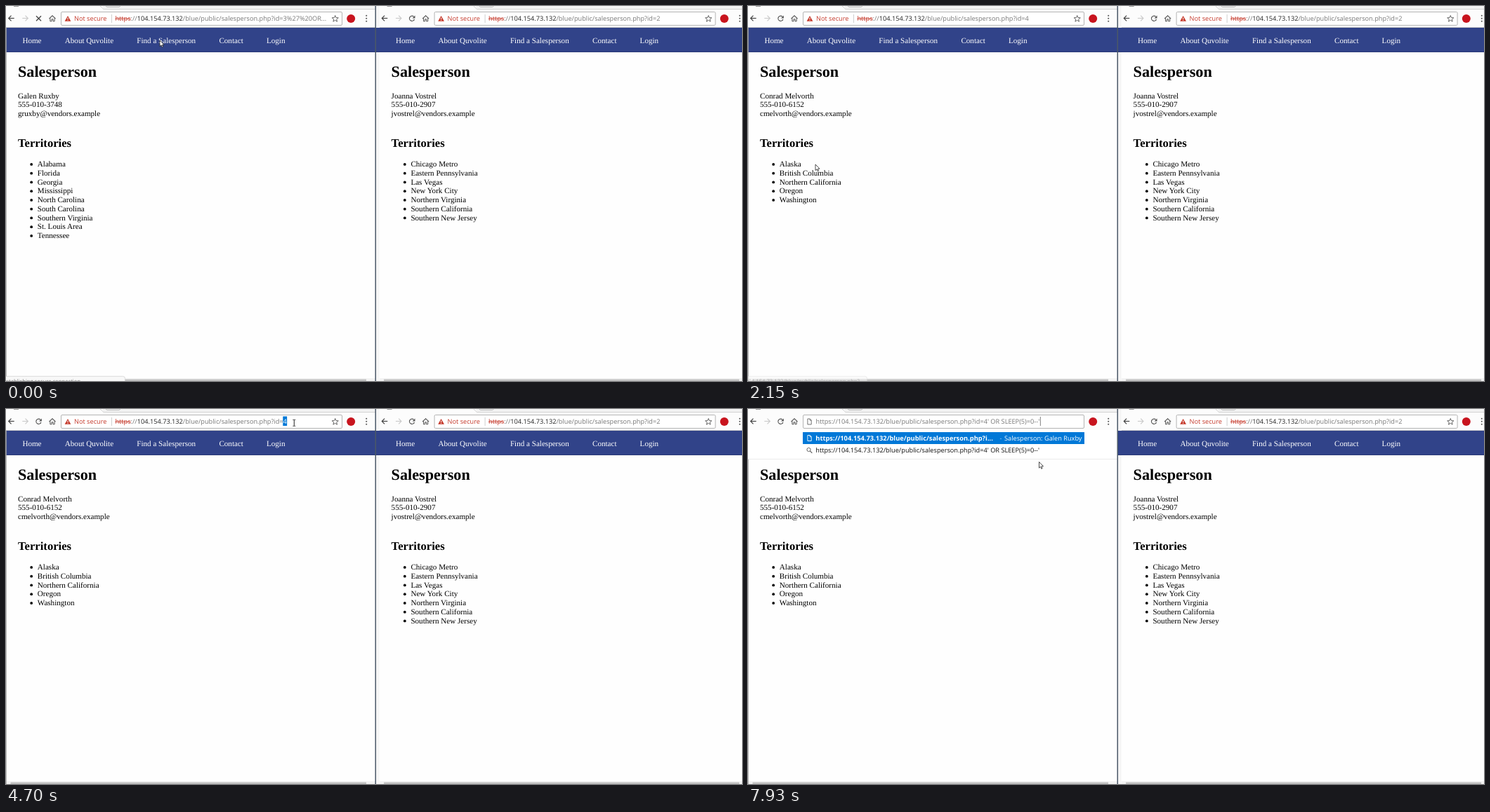
These frames come from a looping animation (1048 by 535 pixels, 8000 ms). An HTML page with a canvas:

```html
<!DOCTYPE html>
<html lang="en">
<head>
<meta charset="utf-8">
<title>Two browser windows</title>
<style>
html, body { margin: 0; width: 100%; height: 100%; overflow: hidden; background: #fefefe; }
canvas { display: block; }
</style>
</head>
<body>
<canvas id="stage" width="1048" height="535"></canvas>
<script>
const ctx = document.getElementById('stage').getContext('2d');
const LOOP = 8000;
const SERIF = '"Liberation Serif", serif';
const UI = '"Open Sans", sans-serif';
const BODY = 11.1, LINE = 12.75, URL_SIZE = 9.2, SMALL = 7.7;
const RIGHT = 531.6;
const BLUE = '#0078d7', RED = '#c5392b', INK = '#000';
const HOST = '104.154.73.132', BASE = '/blue/public/';
const PROFILE_PATH = BASE + 'salesperson.php?id=';
const FULL = 'https://' + HOST + PROFILE_PATH;
const INJECTED = FULL + "4' OR SLEEP(5)=0--'";

const galen = {
  name: 'Galen Ruxby', phone: '555-010-3748', mail: 'gruxby@vendors.example',
  areas: ['Alabama', 'Florida', 'Georgia', 'Mississippi', 'North Carolina', 'South Carolina',
    'Southern Virginia', 'St. Louis Area', 'Tennessee']
};
const joanna = {
  name: 'Joanna Vostrel', phone: '555-010-2907', mail: 'jvostrel@vendors.example',
  areas: ['Chicago Metro', 'Eastern Pennsylvania', 'Las Vegas', 'New York City',
    'Northern Virginia', 'Southern California', 'Southern New Jersey']
};
const conrad = {
  name: 'Conrad Melvorth', phone: '555-010-6152', mail: 'cmelvorth@vendors.example',
  areas: ['Alaska', 'British Columbia', 'Northern California', 'Oregon', 'Washington']
};
const ELSIE = 'Elsie Dulvin', DOROTHY = 'Dorothy Fenstrup';
const states = [
  ['Alabama (AL)', galen.name], ['Alaska (AK)', conrad.name], ['Arizona (AZ)', ELSIE],
  ['Arkansas (AR)', 'Henrietta Udven'],
  ['California (CA)', 'Northern California/' + conrad.name, 'Southern California/' + joanna.name],
  ['Colorado (CO)', ELSIE], ['Connecticut (CT)', DOROTHY], ['Delaware (DE)', DOROTHY],
  ['Florida (FL)', galen.name]
];

// time, x, y, shape
const pointer = [
  [0, 219, 49, arrow], [270, 214, 54, arrow], [400, 208, 56, arrow], [550, 207, 58, arrow],
  [700, 180, 140, arrow], [820, 140, 230, arrow], [940, 113, 281, arrow], [1090, 103, 262, arrow],
  [1220, 92, 238, arrow], [1370, 95, 230, hand], [1490, 96, 228, hand], [1610, 96.7, 226, hand],
  [2150, 96, 226, arrow], [2300, 190, 165, arrow], [2430, 352, 64, arrow], [2580, 380, 46, arrow],
  [2730, 401, 32, arrow], [2880, 404, 30, beam], [3010, 405, 25.5, beam], [3160, 408, 22, beam],
  [3290, 410.3, 19.8, beam], [6730, 410, 18, arrow], [7120, 416, 50, arrow], [7240, 422, 87, arrow],
  [7780, 421, 83, arrow], [7930, 414.5, 75.5, arrow]
];
const bubbleAlpha = [[0, 1], [270, .66], [400, .33], [550, 0], [1370, .25], [1490, .5],
  [1610, .75], [1730, 1], [2150, .5], [2300, 0]];
const selection = [[0, ''], [3160, 'all'], [3440, 'id'], [3850, 'all'], [4120, 'id'],
  [4430, 'all'], [4700, 'id'], [6430, '']];
const menuAlpha = [[0, 0], [6730, .4], [6850, .75], [6970, 1], [7390, .4], [7520, 0]];

const at = (track, t) => track.findLast(step => step[0] <= t);

function rect(x, y, w, h, color) {
  ctx.fillStyle = color;
  ctx.fillRect(x, y, w, h);
}

function setFont(size, family, weight = 400) {
  ctx.font = `${weight} ${size}px ${family}`;
}

// Returns the x where the text ends.
function text(str, x, y, size, color, family = UI, weight = 400) {
  setFont(size, family, weight);
  ctx.fillStyle = color;
  ctx.fillText(str, x, y);
  return x + ctx.measureText(str).width;
}

function serif(str, x, y, color = INK, weight = 400, size = BODY) {
  return text(str, x, y, size, color, SERIF, weight);
}

function poly(points, fill, stroke, width = 1, close = true) {
  ctx.beginPath();
  points.forEach(([x, y]) => ctx.lineTo(x, y));
  if (close) ctx.closePath();
  if (fill) { ctx.fillStyle = fill; ctx.fill(); }
  if (stroke) { ctx.strokeStyle = stroke; ctx.lineWidth = width; ctx.stroke(); }
}

const line = (points, color, width) => poly(points, null, color, width, false);

function circle(x, y, r, color) {
  ctx.beginPath();
  ctx.arc(x, y, r, 0, Math.PI * 2);
  ctx.fillStyle = color;
  ctx.fill();
}

function placed(x, y, draw) {
  ctx.save();
  ctx.translate(x, y);
  draw();
  ctx.restore();
}

function faded(alpha, draw) {
  if (!alpha) return;
  ctx.save();
  ctx.globalAlpha = alpha;
  draw();
  ctx.restore();
}

// Pointers, drawn around their hot spot
function arrow() {
  poly([[0, 0], [0, 8.6], [2, 6.8], [3.3, 9.8], [4.6, 9.2], [3.4, 6.3], [6, 6.2]], '#fff', '#222', .8);
}

function hand() {
  poly([[-.8, .6], [0, 0], [.8, .6], [.9, 4], [5, 5], [5.6, 6], [5, 10], [4.2, 12.5], [-.4, 12.5],
    [-3, 8.5], [-2.6, 7.3], [-.8, 8.2]], '#fff', '#222', .9);
  line([[2.4, 4.6], [2.4, 6.8]], '#333', .6);
  line([[3.9, 5], [3.9, 7]], '#333', .6);
}

function beam() {
  line([[0, -4], [0, 4]], '#222', 1);
  line([[-2, -4.5], [2, -4.5]], '#222', .8);
  line([[-2, 4.5], [2, 4.5]], '#222', .8);
}

// Toolbar icons, centred on the origin
function backIcon(color) {
  line([[4.2, 0], [-3.6, 0]], color, 1.2);
  line([[0, -3.8], [-3.8, 0], [0, 3.8]], color, 1.2);
}

function reloadIcon() {
  ctx.beginPath();
  ctx.arc(0, 0, 3.6, .35, Math.PI * 1.75);
  ctx.strokeStyle = '#555';
  ctx.lineWidth = 1.2;
  ctx.stroke();
  poly([[4.4, -4.4], [4.4, -.4], [.5, -.4]], '#555');
}

function stopIcon() {
  line([[-3.5, -3.5], [3.5, 3.5]], '#444', 1.3);
  line([[-3.5, 3.5], [3.5, -3.5]], '#444', 1.3);
}

function homeIcon() {
  line([[-4.6, .3], [0, -4], [4.6, .3]], '#555', 1.1);
  line([[-3.1, -.6], [-3.1, 4], [-1, 4], [-1, 1], [1, 1], [1, 4], [3.1, 4], [3.1, -.6]], '#555', 1);
}

function starIcon() {
  const points = Array.from({ length: 10 }, (_, i) => {
    const a = i * Math.PI / 5, r = i % 2 ? 2.1 : 4.8;
    return [r * Math.sin(a), -r * Math.cos(a)];
  });
  poly(points, null, '#555', .9);
}

function pageIcon(color) {
  poly([[-2.6, -4], [.8, -4], [2.7, -2], [2.7, 4], [-2.6, 4]], null, color, .9);
  line([[.6, -4], [.6, -1.8], [2.7, -1.8]], color, .8);
}

function searchIcon() {
  ctx.beginPath();
  ctx.arc(-.8, -.8, 2.6, 0, Math.PI * 2);
  ctx.strokeStyle = '#555';
  ctx.lineWidth = .9;
  ctx.stroke();
  line([[1.1, 1.1], [4, 4]], '#555', 1.1);
}

function warningIcon() {
  poly([[0, -4], [4.4, 3.8], [-4.4, 3.8]], RED);
  rect(-.5, -1.4, 1, 2.6, '#fff');
  rect(-.5, 1.9, 1, 1, '#fff');
}

function toolbar(width, loading, typing) {
  rect(0, 0, width, 30.5, '#fcfcfc');
  rect(138, 0, width - 138, 5, '#f3f3f3');
  line([[134, 0], [139, 4.6], [width, 4.6]], '#c9c9c9', .8);
  line([[142, 0], [144, 1.4], [161, 1.4], [163, 0]], '#aaa', .8);
  rect(11, 0, 7, 1, '#999');
  rect(0, 30, width, 1, '#c8c8c8');
  placed(7.5, 17.5, () => backIcon('#444'));
  placed(27.5, 17.5, () => { ctx.scale(-1, 1); backIcon('#ccc'); });
  placed(46.5, 17.8, loading ? stopIcon : reloadIcon);
  placed(66, 17.8, homeIcon);
  ctx.fillStyle = '#fff';
  ctx.strokeStyle = '#b4b4b4';
  ctx.lineWidth = 1;
  ctx.beginPath();
  ctx.roundRect(78.5, 8.5, 400, 19, 1.5);
  ctx.fill();
  ctx.stroke();
  if (!typing) {
    placed(88, 18, warningIcon);
    text('Not secure', 97, 21.4, URL_SIZE, RED);
    rect(150, 12, 1, 12, '#d0d0d0');
    placed(468.7, 18.3, starIcon);
  }
  circle(491.2, 18, 6, '#c8141e');
  [-4, 0, 4].forEach(dy => circle(513.2, 17.8 + dy, 1.05, '#555'));
}

function caretAt(x) {
  rect(x + .6, 11, .8, 13, '#666');
}

function address(path, mode = '', caret = false) {
  const x = 155.4, y = 21.4;
  setFont(URL_SIZE, UI);
  const widthOf = s => ctx.measureText(s).width;
  const end = x + widthOf('https://' + HOST + path);
  const scheme = widthOf('https');
  const all = mode === 'all';
  const tint = color => all ? '#fff' : color;
  if (all) rect(x, 10.5, end - x, 13.5, BLUE);
  let cx = text('https', x, y, URL_SIZE, tint(RED));
  cx = text('://', cx, y, URL_SIZE, tint('#777'));
  cx = text(HOST, cx, y, URL_SIZE, tint('#222'));
  text(path, cx, y, URL_SIZE, tint('#777'));
  rect(x, 17.8, scheme, .9, tint(RED));
  if (mode === 'id') {
    const digit = widthOf(path.at(-1));
    rect(end - digit - .3, 10.5, digit + .6, 13.5, BLUE);
    text(path.at(-1), end - digit, y, URL_SIZE, '#fff');
  }
  if (caret) caretAt(end);
}

function nav(x, width) {
  rect(x, 31, width, 35, '#314389');
  rect(x, 65, width, 1, '#2b3a78');
}

function navLinks() {
  [['Home', 23.4], ['About Quvolite', 83.8], ['Find a Salesperson', 186.3], ['Contact', 303.4],
    ['Login', 371]].forEach(([label, x]) => serif(label, x, 52.7, '#fff'));
}

function profile(person) {
  serif('Salesperson', 17, 101.2, INK, 700, 22.2);
  [person.name, person.phone, person.mail].forEach((s, i) => serif(s, 17, 131.6 + i * LINE));
  serif('Territories', 17, 201.3, INK, 700, 16.65);
  person.areas.forEach((area, i) => {
    const y = 229 + i * LINE;
    circle(36.2, y - 3.1, 1.9, INK);
    serif(area, 44.8, y);
  });
}

function link(name, y) {
  const end = serif(name, 44.8, y, '#0000ee');
  rect(44.8, y + 1, end - 44.8, .8, '#0000ee');
}

function territories() {
  serif('Find a Salesperson', 17, 101.2, INK, 700, 22.2);
  serif('Use the list below to find a salesperson nearby. We are ready to serve you!', 17, 131.5);
  serif('UNITED STATES', 17, 155.3, INK, 700);
  let y = 179.1;
  for (const [state, ...entries] of states) {
    serif(state, 17, y);
    for (const entry of entries) {
      const parts = entry.split('/');
      y += LINE;
      rect(34.8, y - 5, 4, 4, INK);
      if (parts.length > 1) {
        serif(parts[0], 44.8, y);
        y += LINE;
      }
      link(parts.at(-1), y);
    }
    y += LINE + 11.1;
  }
  rect(514.5, 31, 11.5, 504, '#f1f1f1');
  rect(515.7, 43, 9.3, 96, '#c1c1c1');
  poly([[517.8, 38.8], [520.2, 36.2], [522.6, 38.8]], '#999');
  poly([[517.5, 523.8], [520.2, 526.8], [523, 523.8]], '#444');
}

function bottomBar(width, end) {
  rect(0, 531, width, 4, '#f3f3f3');
  rect(6.5, 532.5, end - 6.5, 2.5, '#c1c1c1');
}

function bubble(label) {
  ctx.beginPath();
  ctx.roundRect(-5, 528.3, 174.5, 20, 3);
  ctx.fillStyle = '#f8f8f8';
  ctx.fill();
  ctx.strokeStyle = '#d4d4d4';
  ctx.lineWidth = .8;
  ctx.stroke();
  text(label, -4, 538, SMALL, '#777');
}

function dropdown() {
  rect(0, 30, 526, 42, '#fff');
  rect(0, 71, 526, .8, '#e6e6e6');
  rect(78, 33, 401, 17, BLUE);
  placed(87.5, 41.5, () => pageIcon('#fff'));
  text(FULL.replace('d=', '') + '...', 96.3, 44.8, 9.3, '#fff', UI, 700);
  text('-', 358.5, 44.8, URL_SIZE, '#9cc9ee');
  text('Salesperson: ' + galen.name, 365, 44.8, URL_SIZE, '#fff');
  placed(87.3, 58.8, searchIcon);
  text(INJECTED, 96.3, 62, URL_SIZE, '#111');
}

function contextMenu(t) {
  rect(412, 22, 151, 160, 'rgba(0,0,0,.18)');
  rect(410, 20, 150, 160, '#f2f2f2');
  ctx.strokeStyle = '#b5b5b5';
  ctx.lineWidth = 1;
  ctx.strokeRect(410.5, 20.5, 149, 159);
  const hovered = t >= 7240 ? 'Paste' : t >= 7120 ? 'Cut' : '';
  let y = 22;
  for (const item of ['Undo', '-', 'Cut', 'Copy', 'Paste', 'Paste and search', 'Delete', '-',
    'Select all', '-', 'Edit search engines...']) {
    if (item === '-') {
      rect(428, y + 2, 130, .8, '#ccc');
      y += 5;
      continue;
    }
    if (item === hovered) rect(412, y, 146, 17.5, '#91c9f7');
    const enabled = !['Cut', 'Copy', 'Delete'].includes(item);
    text(item, 430, y + 11.6, SMALL, enabled ? '#111' : '#999');
    y += 17.5;
  }
}

function leftWindow(t) {
  const listing = t >= 120 && t < 1880;
  const pasted = t >= 7390;
  nav(0, listing ? 514.5 : 526);
  navLinks();
  bottomBar(526, listing ? 501 : 513);
  if (listing) territories();
  else profile(t < 120 ? galen : conrad);
  rect(0, 31, .8, 504, '#aaa');
  toolbar(526, t < 120, pasted);
  if (pasted) {
    placed(87.5, 18, () => pageIcon('#666'));
    caretAt(text(INJECTED, 96.5, 21.4, URL_SIZE, '#777'));
  } else if (t < 120) {
    address(PROFILE_PATH + '3%27%20OR...');
  } else if (listing) {
    address(BASE + 'territories.php');
  } else {
    const caret = (t >= 3010 && t < 3160) || (t >= 6430 && t < 6730);
    address(PROFILE_PATH + '4', at(selection, t)[1], caret);
  }
  if (t >= 7520) dropdown();
  faded(at(bubbleAlpha, t)[1], () => bubble(t < 1370
    ? 'Establishing secure connection...'
    : HOST + PROFILE_PATH.replace('id=', '...')));
}

function rightWindow() {
  rect(526, 0, 522, 535, '#fefefe');
  placed(RIGHT, 0, () => {
    toolbar(517, false, false);
    address(PROFILE_PATH + '2');
    bottomBar(517, 512.5);
    profile(joanna);
  });
  rect(527, 0, 4.6, 535, '#f5f5f5');
  nav(526, 522);
  placed(RIGHT, 0, navLinks);
  rect(525.5, 0, 1.5, 535, '#4b5868');
}

function draw(t) {
  rect(0, 0, 1048, 535, '#fefefe');
  ctx.textRendering = 'geometricPrecision';
  leftWindow(t);
  rightWindow();
  faded(at(menuAlpha, t)[1], () => contextMenu(t));
  const [, x, y, shape] = at(pointer, t);
  placed(x, y, shape);
}

function tick() {
  draw(performance.now() % LOOP);
  requestAnimationFrame(tick);
}
tick();
</script>
</body>
</html>
```
